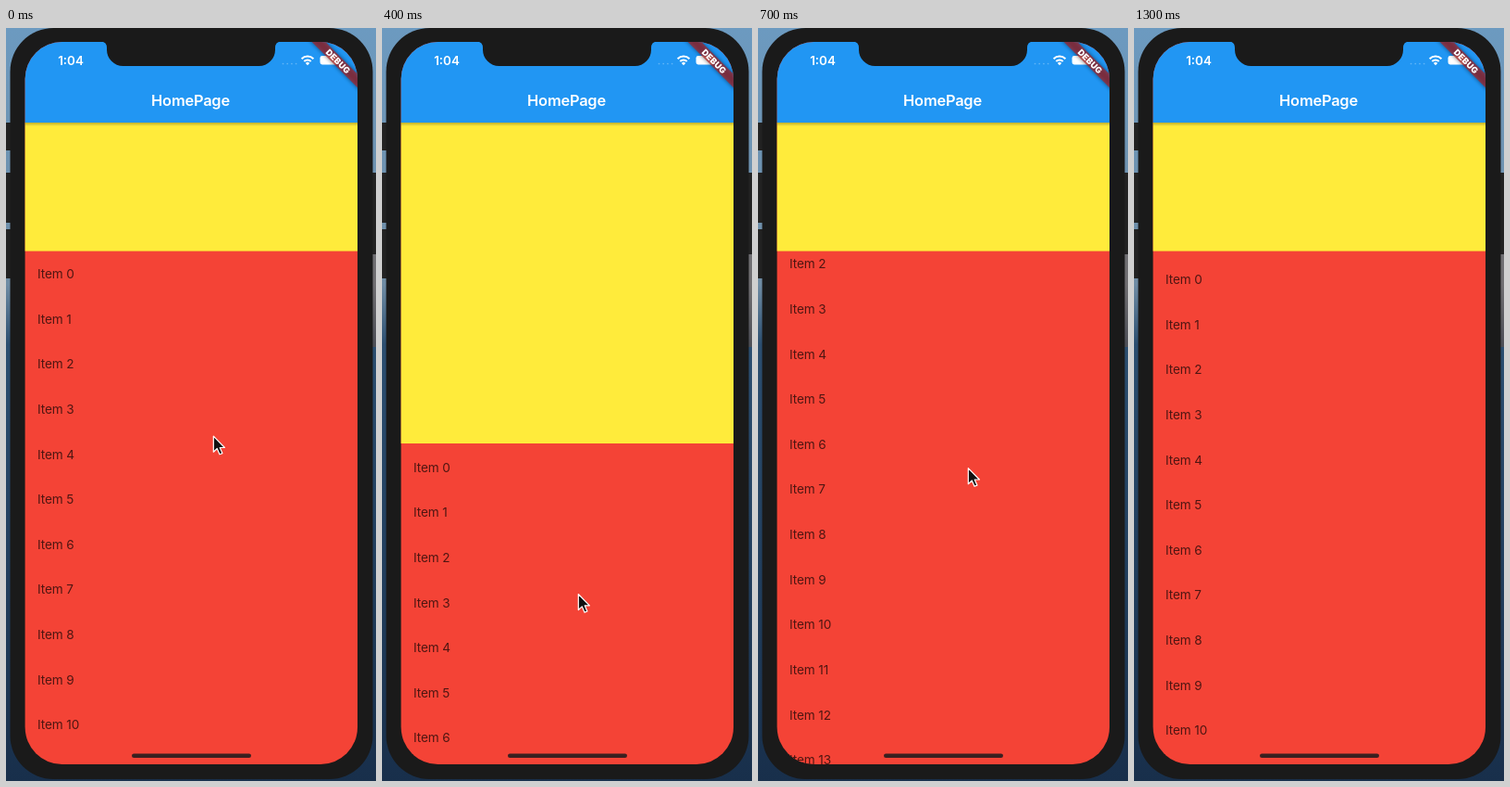
Animation of 400 by 812 pixels, one loop 1.4 s. Source, as an HTML page:

```html
<!DOCTYPE html>
<html lang="en">
<head>
<meta charset="utf-8">
<title>HomePage</title>
<style>
  html, body { margin: 0; width: 100%; height: 100%; overflow: hidden; background: #17304f; }
  svg { display: block; width: 100vw; height: 100vh; }
  text { font-family: Inter, "Liberation Sans", sans-serif; fill: #fff; }
  #list text { font-size: 13.6px; letter-spacing: -.1px; fill: #000; fill-opacity: .68; }
</style>
</head>
<body>
<svg viewBox="0 0 400 812" preserveAspectRatio="none">
  <defs>
    <linearGradient id="sky" x1="0" y1="0" x2="0" y2="1">
      <stop offset="0" stop-color="#6c9ac0"/>
      <stop offset=".34" stop-color="#6f8ca4"/>
      <stop offset=".42" stop-color="#2b4e70"/>
      <stop offset="1" stop-color="#182f4b"/>
    </linearGradient>
    <linearGradient id="shade" x1="0" y1="0" x2="0" y2="1">
      <stop offset="0" stop-color="#000" stop-opacity=".25"/>
      <stop offset="1" stop-color="#000" stop-opacity="0"/>
    </linearGradient>
    <filter id="soft" x="-20%" y="-100%" width="140%" height="300%">
      <feGaussianBlur stdDeviation="2"/>
    </filter>
    <clipPath id="screen"><rect x="20.6" y="15" width="359.4" height="779" rx="40"/></clipPath>
    <circle id="halo" cy="2.2" r="26.3" fill="none"/>
    <rect id="band" x="-45" y="-5.2" width="90" height="10.4"/>
  </defs>

  <rect width="400" height="812" fill="url(#sky)"/>
  <path d="M395 244h5v100h-5z" fill="#71503f" opacity=".5"/>
  <path d="M0 102h6v30H0zM0 156h6v54H0zM0 217h6v53H0zM395 156h5v88h-5z" fill="#222"/>
  <rect x="4.5" width="392" height="810" rx="47" fill="#1a1a1a"/>

  <g clip-path="url(#screen)">
    <rect width="400" height="812" fill="#f44336"/>
    <g id="list"></g>
    <rect id="header" y="102" width="400" fill="#ffeb3b"/>
    <rect y="102" width="400" height="4" fill="url(#shade)"/>
    <rect width="400" height="102" fill="#2196f3"/>
    <text x="199.5" y="83.7" text-anchor="middle" font-size="16.4" font-weight="600" letter-spacing="-.2">HomePage</text>
    <text x="70" y="40" text-anchor="middle" font-size="13.4" font-weight="600">1:04</text>
    <path d="M299.500 38.500H315" stroke="#fff" stroke-opacity=".3" stroke-width="1.700" stroke-linecap="round" stroke-dasharray="0 4.700"/>
    <g fill="none" stroke="#fff" stroke-width="2">
      <path d="M319.6 33.2a9 9 0 0 1 12.8 0"/>
      <path d="M322.3 36a5.2 5.2 0 0 1 7.4 0"/>
    </g>
    <path d="M326 40.2l-2.1-2.3a3 3 0 0 1 4.2 0z" fill="#fff"/>
    <rect x="339.5" y="30" width="20" height="9.5" rx="2.4" fill="#fff"/>
    <g transform="translate(359 36) rotate(45)">
      <use href="#band" opacity=".5" filter="url(#soft)"/>
      <use href="#band" fill="#b71c1c" fill-opacity=".63"/>
      <text y="3.3" text-anchor="middle" font-size="9.2" font-weight="900" letter-spacing=".2">DEBUG</text>
    </g>
    <rect x="136" y="782.5" width="129" height="4.6" rx="2.3" fill="#3a2020"/>
  </g>
  <path d="M103 14.5q6 .5 6 7v2a17.5 17.5 0 0 0 17.5 17.5h147a17.5 17.5 0 0 0 17.5-17.5v-2q0-6.5 6-7z" fill="#1a1a1a"/>

  <g id="pointer">
    <g id="ring">
      <use href="#halo" stroke="#fff" stroke-opacity=".8" stroke-width="3.2"/>
      <use href="#halo" stroke="#222" stroke-width="1.5"/>
    </g>
    <path d="M.3 1.2V18.2L4.2 14.5L7 20.8L9.900 19.600L7.200 13.500H12.400Z" fill="#111" stroke="#fff" stroke-width="1.200" stroke-linejoin="round"/>
  </g>
</svg>
<script>
  const LOOP = 1400, STEP = 100;
  const ROW = 48.65, ROWS = 22, FIRST_ROW = 265;
  const BAR = 102, CLOSED = 240.6, OPEN = 448;
  const $ = id => document.getElementById(id);

  // Drags and releases alternate: even spans are drags, odd spans glide out.
  const keys = [
    { time: 0, scroll: 0, x: 224, y: 439 },
    { time: 200, scroll: 218, x: 209, y: 688 },
    { time: 500, scroll: 207.5, x: 213.5, y: 570 },
    { time: 700, scroll: -108, x: 227, y: 473.5 },
    { time: 900, scroll: -328.5, x: 233, y: 437.5 },
    { time: 1100, scroll: -116, x: 196.5, y: 684 },
    { time: 1300, scroll: 6, x: 196.5, y: 684 }
  ];
  const last = keys[keys.length - 1].time;

  const mix = (a, b, u) => a + (b - a) * u;
  const clamp = (v, lo, hi) => Math.min(hi, Math.max(lo, v));
  const dragEase = u => u ** 1.3;
  const glideEase = u => 1 - (1 - u) ** 2;
  const place = (id, x, y) => $(id).setAttribute("transform", `translate(${x} ${y})`);
  const show = (id, on) => { $(id).style.display = on ? "" : "none"; };

  function pose(t) {
    const i = Math.max(0, keys.findLastIndex(k => k.time <= t && k.time < last));
    const a = keys[i], b = keys[i + 1];
    const u = clamp((t - a.time) / (b.time - a.time), 0, 1);
    const drag = i % 2 === 0;
    return {
      scroll: mix(a.scroll, b.scroll, drag ? dragEase(u) : glideEase(u)),
      x: mix(a.x, b.x, u),
      y: mix(a.y, b.y, u),
      pressed: drag && t > 0
    };
  }

  for (let i = 0; i < ROWS; i++) {
    const row = document.createElementNS("http://www.w3.org/2000/svg", "text");
    row.setAttribute("x", 34);
    row.setAttribute("y", i * ROW + 4.9);
    row.textContent = "Item " + i;
    $("list").append(row);
  }

  function draw(now) {
    const t = Math.floor(now % LOOP / STEP) * STEP;
    const { scroll, x, y, pressed } = pose(t);
    // Only a drag opens the header; the final bounce moves the list alone.
    const edge = t < last ? clamp(CLOSED + scroll, CLOSED, OPEN) : CLOSED;
    $("header").setAttribute("height", edge - BAR);
    place("list", 0, FIRST_ROW + scroll);
    place("pointer", x, y);
    show("pointer", t < last);
    show("ring", pressed);
  }

  const start = performance.now();
  function tick() {
    draw(performance.now() - start);
    requestAnimationFrame(tick);
  }
  tick();
</script>
</body>
</html>
```
